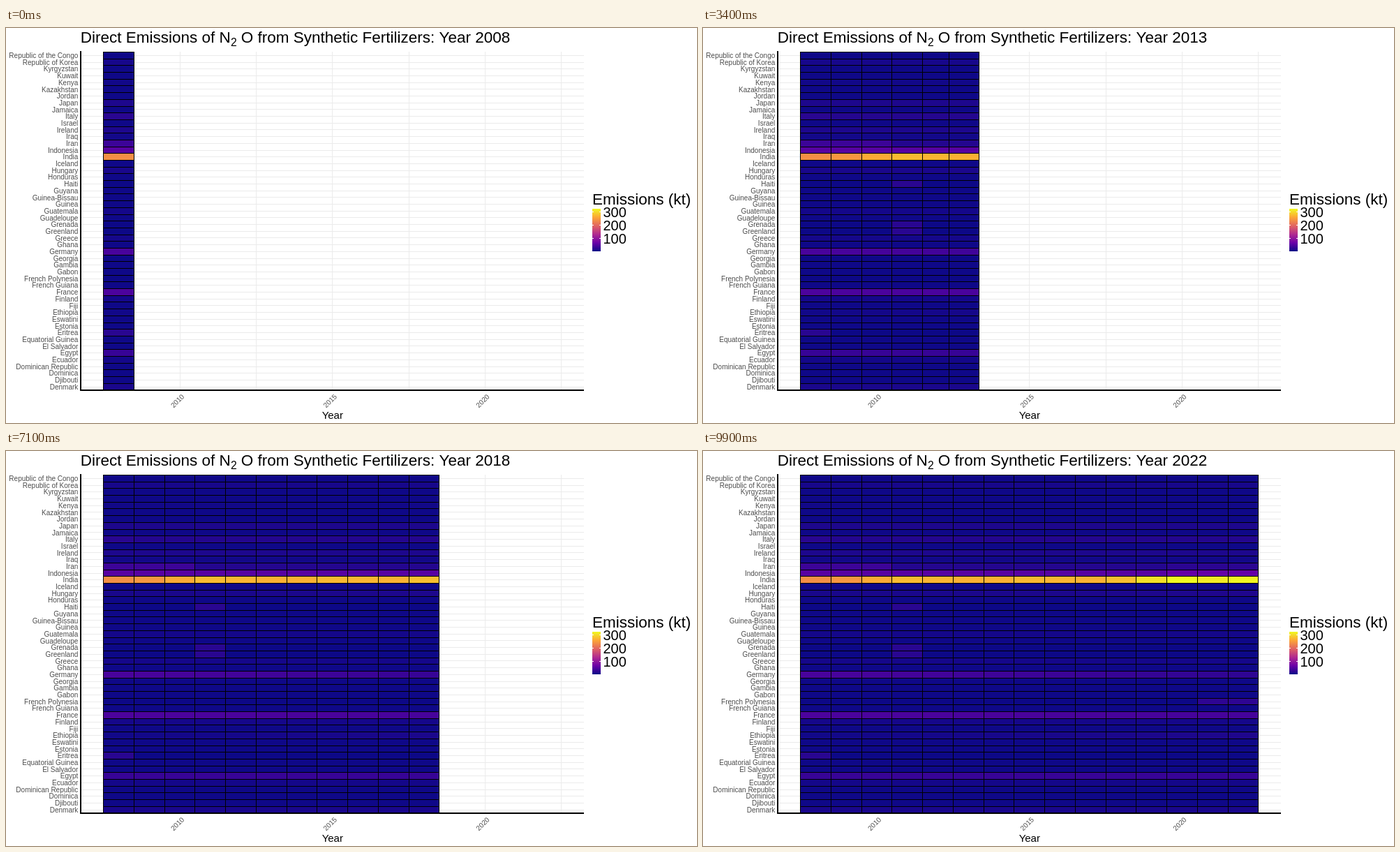
Animation of 990x566 px, one loop 10 s. Source, as an HTML page with a canvas:

```html
<!DOCTYPE html>
<html lang="en">
<head>
<meta charset="utf-8">
<title>Direct Emissions of N2O from Synthetic Fertilizers</title>
<style>
html, body { margin: 0; width: 990px; height: 566px; overflow: hidden; background: #fff; }
canvas { display: block; }
</style>
</head>
<body>
<canvas id="stage" width="990" height="566"></canvas>
<script>
const ctx = document.getElementById('stage').getContext('2d');
const FONT = '"Liberation Sans", Arial, sans-serif';
const FRAMES = 100, STEP = 100, YEARS = 15;
const LEFT = 107, RIGHT = 828, TOP = 34, BOTTOM = 519;
const X0 = 161.6, DX = 43.74, Y0 = 39.4, DY = 9.687;

const rows = ('Republic of the Congo,Republic of Korea,Kyrgyzstan,Kuwait,Kenya,Kazakhstan,Jordan,Japan,' +
  'Jamaica,Italy,Israel,Ireland,Iraq,Iran,Indonesia,India,Iceland,Hungary,Honduras,Haiti,Guyana,' +
  'Guinea-Bissau,Guinea,Guatemala,Guadeloupe,Grenada,Greenland,Greece,Ghana,Germany,Georgia,Gambia,' +
  'Gabon,French Polynesia,French Guiana,France,Finland,Fiji,Ethiopia,Eswatini,Estonia,Eritrea,' +
  'Equatorial Guinea,El Salvador,Egypt,Ecuador,Dominican Republic,Dominica,Djibouti,Denmark').split(',');

// Emissions as a share of the scale maximum; k counts years from 2008.
const india = [.73, .755, .81, .85, .835, .825, .825, .845, .835, .83, .86, .94, 1, .965, .99];
const spike = k => k === 3 ? .06 : 0;
const share = {
  'India': k => india[k],
  'Indonesia': k => k < 12 ? .16 : .19,
  'Iran': k => k < 3 ? .1 : k < 12 ? .05 : .065,
  'France': k => .135 - k * .001,
  'Germany': k => .13 - k * .004,
  'Egypt': () => .09,
  'Italy': k => k ? .05 : .06,
  'Ireland': () => .035,
  'Japan': () => .035,
  'Hungary': k => .025 + k * .001,
  'Republic of Korea': () => .022,
  'Ethiopia': k => .01 + k * .002,
  'Eritrea': k => k ? 0 : .06,
  'Haiti': spike,
  'Grenada': spike,
  'Greenland': spike,
  'French Polynesia': k => k > 12 ? .07 : 0,
  'Denmark': () => .028,
  'Greece': () => .018,
  'Finland': () => .018,
  'Guatemala': () => .016,
  'Iraq': () => .012,
  'Kenya': () => .01,
  'Ecuador': () => .014
};

const plasma = [[13, 8, 135], [106, 0, 168], [177, 42, 144], [225, 100, 98], [252, 166, 54], [240, 249, 33]];
const mix = (a, b, p) => a.map((v, i) => v + (b[i] - v) * p);
const css = c => `rgb(${c.map(Math.round)})`;
function ramp(v) {
  const s = v * 5, i = Math.min(4, Math.floor(s));
  return mix(plasma[i], plasma[i + 1], s - i);
}
const tint = (row, k) => ramp(share[row] ? share[row](k) : .004);

// Frame on which each year is reached exactly.
const keys = Array.from({ length: YEARS }, (_, k) => Math.round((FRAMES - 1) * k / (YEARS - 1)));

function text(str, x, y, size, color = '#000', align = 'left') {
  ctx.font = `${size}px ${FONT}`;
  ctx.fillStyle = color;
  ctx.textAlign = align;
  ctx.fillText(str, x, y);
}

function box(x, y, w, h, color) {
  ctx.fillStyle = color;
  ctx.fillRect(x, y, w, h);
}

function drawGrid() {
  rows.forEach((_, i) => box(LEFT, Math.floor(Y0 + i * DY), RIGHT - LEFT, 1, '#ebebeb'));
  for (let y = -.5; y < YEARS; y += 2.5) box(Math.floor(X0 + y * DX), TOP, 1, BOTTOM - TOP, '#ebebeb');
}

function drawColumn(pos, colorOf) {
  const x = Math.floor(X0 + (pos - .5) * DX), w = Math.floor(X0 + (pos + .5) * DX) - x;
  ctx.lineWidth = 1;
  ctx.strokeStyle = '#000';
  rows.forEach((row, i) => {
    const y = Math.floor(Y0 + (i - .5) * DY), h = Math.floor(Y0 + (i + .5) * DY) - y;
    box(x, y, w, h, css(colorOf(row)));
    ctx.strokeRect(x + .5, y + .5, w, h);
  });
}

function drawAxes() {
  box(106, 33, 2, 487, '#000');
  box(106, 518, 722, 2, '#000');
  rows.forEach((row, i) => text(row, 103.3, Y0 + i * DY + 3.7, 10, '#4d4d4d', 'right'));
  for (let y = 2; y < YEARS; y += 5) {
    ctx.save();
    ctx.translate(X0 + y * DX + 6.8, 529);
    ctx.rotate(-Math.PI / 4);
    text(2008 + y, 0, 0, 10, '#4d4d4d', 'right');
    ctx.restore();
  }
  text('Year', 467.8, 559.5, 15, '#000', 'center');
}

function drawLegend() {
  text('Emissions (kt)', 840, 252.5, 22.5);
  const g = ctx.createLinearGradient(0, 320, 0, 259);
  plasma.forEach((c, i) => g.addColorStop(i / 5, css(c)));
  box(840, 259, 12, 61, g);
  [300, 200, 100].forEach((v, i) => {
    const y = 263 + i * 19;
    box(840, y, 2, 1, '#fff');
    box(850, y, 2, 1, '#fff');
    text(v, 855.5, y + 7.5, 20);
  });
}

function drawTitle(year) {
  text('Direct Emissions of N', 106.8, 21, 22.5);
  text('2', 322, 25.5, 15.75);
  text('O from Synthetic Fertilizers: Year ' + year, 336.8, 21, 22.5);
}

function draw(frame) {
  box(0, 0, 990, 566, '#fff');
  drawGrid();
  let k = YEARS - 1;
  while (keys[k] > frame) k--;
  for (let y = 0; y <= k; y++) drawColumn(y, row => tint(row, y));
  const p = k < YEARS - 1 ? (frame - keys[k]) / (keys[k + 1] - keys[k]) : 0;
  if (p > 0) drawColumn(k + p, row => mix(tint(row, k), tint(row, k + 1), p));
  drawAxes();
  drawLegend();
  drawTitle(Math.round(2008 + (YEARS - 1) * frame / (FRAMES - 1)));
}

let start = null;
function tick(now) {
  if (start === null) start = now;
  draw(Math.floor((now - start) / STEP) % FRAMES);
  requestAnimationFrame(tick);
}
draw(0);
requestAnimationFrame(tick);
</script>
</body>
</html>
```
